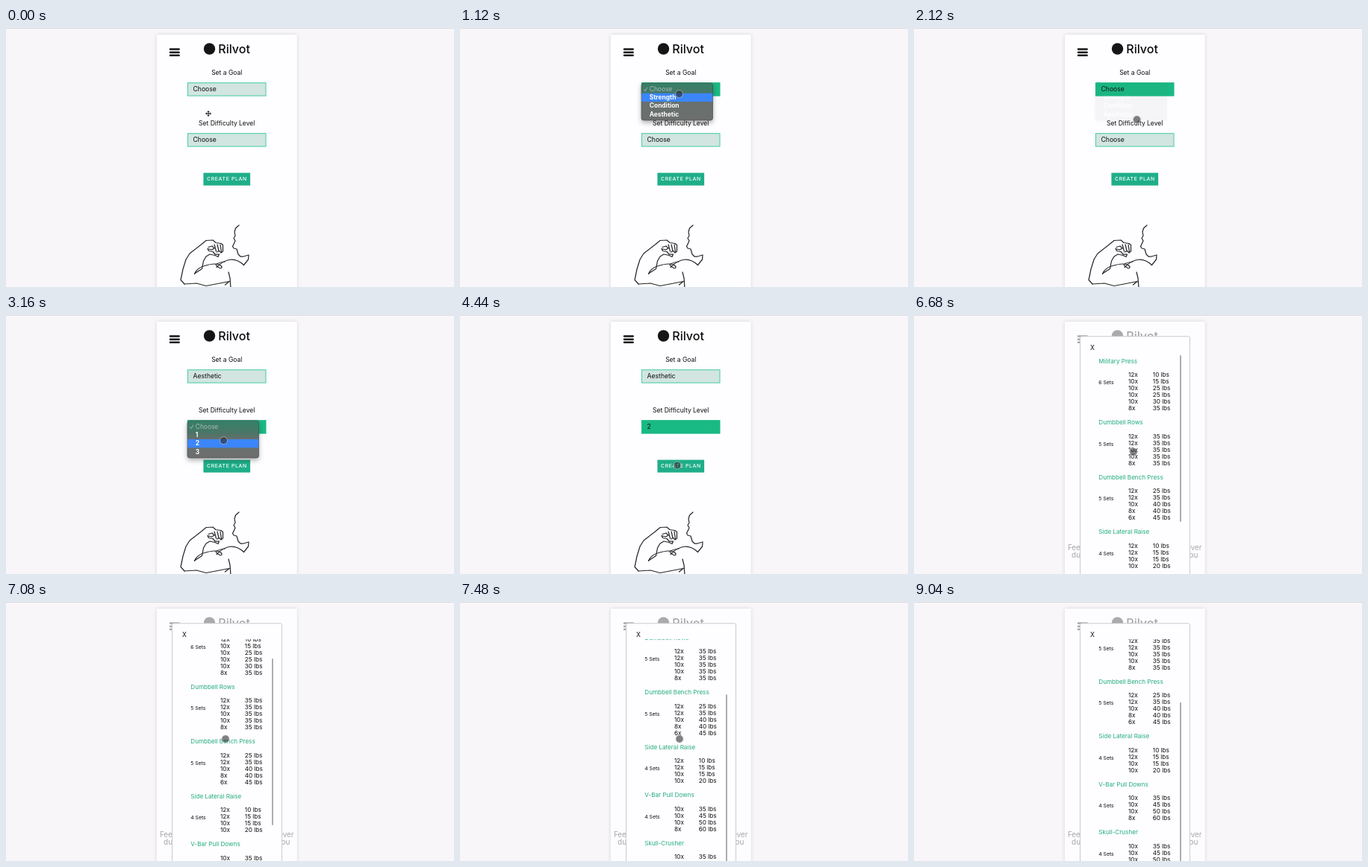
Write an HTML page that moves like this. It is 600x348 px and loops after 9.4 s.

```html
<!DOCTYPE html>
<html lang="en">
<head>
<meta charset="utf-8">
<title>Workout planner</title>
<style>
  html, body { margin: 0; width: 100%; height: 100%; overflow: hidden; background: #f8f6f9; }
  svg { display: block; width: 600px; height: 348px; }
  text { font-family: Inter, "Open Sans", sans-serif; white-space: pre; }
</style>
</head>
<body>
<svg id="stage" viewBox="0 0 600 348" xmlns="http://www.w3.org/2000/svg">
  <defs>
    <clipPath id="listClip"><rect x="224" y="50" width="145" height="298"/></clipPath>
    <linearGradient id="glass" x1="0" y1="0" x2="0" y2="1">
      <stop offset="0" stop-color="#348168"/>
      <stop offset=".34" stop-color="#4b7566"/>
      <stop offset=".5" stop-color="#68706d"/>
      <stop offset="1" stop-color="#6d6e6e"/>
    </linearGradient>
    <filter id="soft" x="-20%" y="-20%" width="140%" height="150%">
      <feDropShadow dx="0" dy="3" stdDeviation="3" flood-opacity=".3"/>
    </filter>
    <filter id="halo" x="-10%" y="-10%" width="120%" height="120%">
      <feDropShadow dx="0" dy="0" stdDeviation="2.5" flood-opacity=".14"/>
    </filter>
  </defs>
</svg>
<script>
const LOOP = 9400;
const GREEN = '#19b983', TEAL = '#1fae89';
const stage = document.getElementById('stage');

function add(parent, tag, attrs, text) {
  const el = document.createElementNS('http://www.w3.org/2000/svg', tag);
  for (const k in attrs) el.setAttribute(k, attrs[k]);
  if (text) el.textContent = text;
  parent.appendChild(el);
  return el;
}
const group = (parent, attrs = {}) => add(parent, 'g', attrs);
const box = (parent, x, y, width, height, fill, more) =>
  add(parent, 'rect', { x, y, width, height, fill, ...more });
// y is the middle of the capitals
const label = (parent, str, x, y, size, more) =>
  add(parent, 'text', { x, y: y + size * 0.36, 'font-size': size, fill: '#0c0c0c', ...more }, str);
const line = (parent, d, width = 1.25) =>
  add(parent, 'path', { d, fill: 'none', stroke: '#29292b', 'stroke-width': width,
    'stroke-linejoin': 'round', 'stroke-linecap': 'round' });
const centred = { 'text-anchor': 'middle' };

// Window and phone panel
box(stage, 0, 0, 600, 348, '#f8f6f9');
box(stage, 0, 0, 600, 1, '#dddce0');
box(stage, 202, 9, 187.5, 350, '#fefdff', { filter: 'url(#halo)' });

// Header
for (const y of [27.2, 31.4, 35.6]) box(stage, 218.8, y, 14, 2.5, '#151515', { rx: 1 });
add(stage, 'circle', { cx: 272.5, cy: 28, r: 7.7, fill: '#151515' });
label(stage, 'Rilvot', 284.3, 28, 16, { 'font-weight': 500 });

// Form page
const form = group(stage);
function makeSelect(title, top) {
  label(form, title, 295.7, top - 13, 8.5, centred);
  const face = box(form, 243.4, top + 0.7, 104.6, 17.4, '#d2e5e0', { stroke: '#45cda4' });
  const value = label(form, 'Choose', 250.6, top + 9, 8.6);
  return { face, value };
}
const goal = makeSelect('Set a Goal', 73);
const level = makeSelect('Set Difficulty Level', 141);

box(form, 264.4, 194.6, 62.7, 17, TEAL);
label(form, 'CREATE PLAN', 296, 203, 6.8, { ...centred, fill: '#fff', 'font-weight': 500, 'letter-spacing': 0.7 });

// Flexed arm drawing: head, chest, outer arm, hand, inner arm, torso
line(form, 'M312 265L307.5 269L306 274L307 279L305 282.5L307 286L303.5 293.5L305 296L309 297L311 304L314 307L318 307L325 305L324.5 311L318.5 318.5');
line(form, 'M318.5 318.5Q311 311 302 311Q291 312 282 321.5');
line(form, 'M239 344L234 338.5L237 324L241 311L246 303L262 290.5L268 285.5L277 285L281 288.5L288 289.5L290.5 291.5V300L288 302L285.5 299.5L282.5 301');
line(form, 'M279 291L281.5 300M283 291L285 299.5M287 291L288.5 301M271 294.5L276 293L279 296L275.5 298L270 296.5L271.5 299.5L277 300.5L280 304L285.5 304L284 307.5L280 305.5L273 304L268 307L264.5 313L262.5 323.5L252.5 330');
line(form, 'M252.5 330.5Q256 322 266 319.5Q282 314.5 288 319.5Q290.5 322.5 287 323Q283 321.5 280.5 317.5Q287 314.5 293 314');
line(form, 'M239 344L255 343L268 346.5L281 344L299 340.5M298 328L300 336L301 350M293.5 345L299 340.5');

// Plan page
const plan = group(stage);
label(plan, 'Feel free to change this plan whenever', 295.7, 312.8, 9.8, centred);
label(plan, 'during the week, so it works for you', 295.7, 322.8, 10, centred);

// Option menus
function makeMenu(top, items) {
  const g = group(stage);
  box(g, 243, top, 95.5, 50, 'url(#glass)', { rx: 3, stroke: '#4a4f4d', 'stroke-width': 0.7, filter: 'url(#soft)' });
  const bar = box(g, 243.3, top, 95, 11.3, '#3b86fb');
  line(g, `M246.5 ${top + 8.6}l1.5 2l2.6 -4.4`, 0.9).setAttribute('stroke', '#a9bdb5');
  items.forEach((name, i) => label(g, name, 253.8, top + 8 + i * 11.2, 8.4,
    i ? { fill: '#fff', 'font-weight': 700 } : { fill: '#a9bdb5' }));
  return { g, bar, top };
}
const goalMenu = makeMenu(74, ['Choose', 'Strength', 'Condition', 'Aesthetic']);
const levelMenu = makeMenu(142, ['Choose', '1', '2', '3']);

// Workout sheet
const sheet = group(stage);
box(sheet, 202, 9, 187.5, 339, '#fefdff', { opacity: 0.64 });
box(sheet, 222.5, 28.8, 147, 340, '#fefdff', { rx: 2, stroke: '#cbcacd', 'stroke-width': 1 });
label(sheet, 'X', 236, 44.2, 8.6);
const list = group(group(sheet, { 'clip-path': 'url(#listClip)' }));

const workouts = [
  ['Military Press', '12x10 10x15 10x25 10x25 10x30 8x35'],
  ['Dumbbell Rows', '12x35 12x35 10x35 10x35 8x35'],
  ['Dumbbell Bench Press', '12x25 12x35 10x40 8x40 6x45'],
  ['Side Lateral Raise', '12x10 12x15 10x15 10x20'],
  ['V-Bar Pull Downs', '10x35 10x45 10x50 8x60'],
  ['Skull-Crusher', '10x35 10x45 10x50 8x60'],
];
let y = 61.7;
for (const [name, plain] of workouts) {
  const sets = plain.split(' ');
  label(list, name, 247.3, y, 8.1, { fill: '#20ad7b' });
  y += 18.5;
  label(list, sets.length + ' Sets', 247.3, y + 10.5, 6.8);
  sets.forEach((s, i) => {
    const [reps, weight] = s.split('x');
    label(list, reps + 'x', 287, y + i * 9, 8.2);
    label(list, weight + ' lbs', 319.8, y + i * 9, 8.2);
  });
  y += 9 * (sets.length - 1) + 19;
}
const thumb = box(sheet, 356, 54, 1.9, 224, '#a9a8ab', { rx: 0.9 });

// Pointers
const touch = add(stage, 'circle', { r: 5, fill: '#2b2c31', 'fill-opacity': 0.6,
  stroke: '#c4c4c6', 'stroke-opacity': 0.7, 'stroke-width': 1 });
const cross = add(stage, 'path', { fill: '#111', stroke: '#fff', 'stroke-width': 0.4,
  d: 'M0 -4.2L2 -2H.7V-.7H2V-2L4.2 0L2 2V.7H.7V2H2L0 4.2L-2 2H-.7V.7H-2V2L-4.2 0L-2 -2V-.7H-.7V-2H-2Z' });

// Tracks: [time, value, ...]
const path = [
  [0, 271, 115], [80, 271, 115], [600, 294, 83], [960, 294, 83], [1300, 293, 95],
  [1800, 297, 117], [1960, 298, 119], [2120, 298.5, 123], [2640, 293, 151], [2800, 293, 151],
  [3120, 291.5, 168.5], [3240, 291.5, 169], [3560, 292, 173], [3840, 292, 173],
  [4360, 291, 202], [4600, 291, 202], [5400, 262, 142], [5540, 262, 142],
  [5760, 297, 186], [5920, 297, 186], [6300, 294, 184], [7920, 294, 184], [8480, 398, 36],
];
const scroll = [
  [6860, 0], [7000, 14], [7160, 46], [7320, 77], [7480, 96.5], [7640, 104], [7800, 107.5],
  [7920, 107.5], [8200, 111],
];
const smooth = u => u * u * (3 - 2 * u);
function at(track, t, col = 1, ease = u => u) {
  if (t <= track[0][0]) return track[0][col];
  for (let i = 1; i < track.length; i++) {
    const a = track[i - 1], b = track[i];
    if (t < b[0]) return a[col] + (b[col] - a[col]) * ease((t - a[0]) / (b[0] - a[0]));
  }
  return track[track.length - 1][col];
}
const ramp = (t, from, to) => Math.min(1, Math.max(0, (t - from) / (to - from)));
const show = (el, opacity) => {
  el.setAttribute('opacity', opacity);
  el.setAttribute('visibility', opacity > 0 ? 'visible' : 'hidden');
};

function setSelect(s, focused, value) {
  s.face.setAttribute('fill', focused ? GREEN : '#d2e5e0');
  s.face.setAttribute('stroke', focused ? GREEN : '#45cda4');
  if (s.value.textContent !== value) s.value.textContent = value;
}
function setMenu(m, t, open, close, py) {
  show(m.g, t < open ? 0 : 1 - ramp(t, close, close + 170));
  const row = Math.min(3, Math.max(0, Math.floor((py - m.top - 2.4) / 11.3)));
  m.bar.setAttribute('y', m.top + 2.4 + row * 11.3);
  m.bar.setAttribute('visibility', row && t >= open && t < close + 80 ? 'visible' : 'hidden');
}

function draw(t) {
  const px = at(path, t, 1, smooth), py = at(path, t, 2, smooth);
  setSelect(goal, t >= 700 && t < 2680, t < 2140 ? 'Choose' : 'Aesthetic');
  setSelect(level, t >= 2680, t < 3800 ? 'Choose' : '2');
  setMenu(goalMenu, t, 720, 1960, py);
  setMenu(levelMenu, t, 2720, 3660, py);

  show(form, 1 - ramp(t, 4590, 4800));
  show(plan, ramp(t, 4720, 5040));
  show(sheet, ramp(t, 5910, 6280));

  const s = at(scroll, t);
  list.setAttribute('transform', `translate(0 ${-s})`);
  thumb.setAttribute('y', 54 + s * 0.727);

  const move = `translate(${px} ${py})`;
  touch.setAttribute('transform', move);
  cross.setAttribute('transform', move);
  show(cross, t < 120 ? 1 : 0);
  show(touch, t >= 120 && t < 8520 ? 1 : 0);
}

const start = performance.now();
function tick() {
  draw((performance.now() - start) % LOOP);
  requestAnimationFrame(tick);
}
draw(0);
requestAnimationFrame(tick);
</script>
</body>
</html>
```
